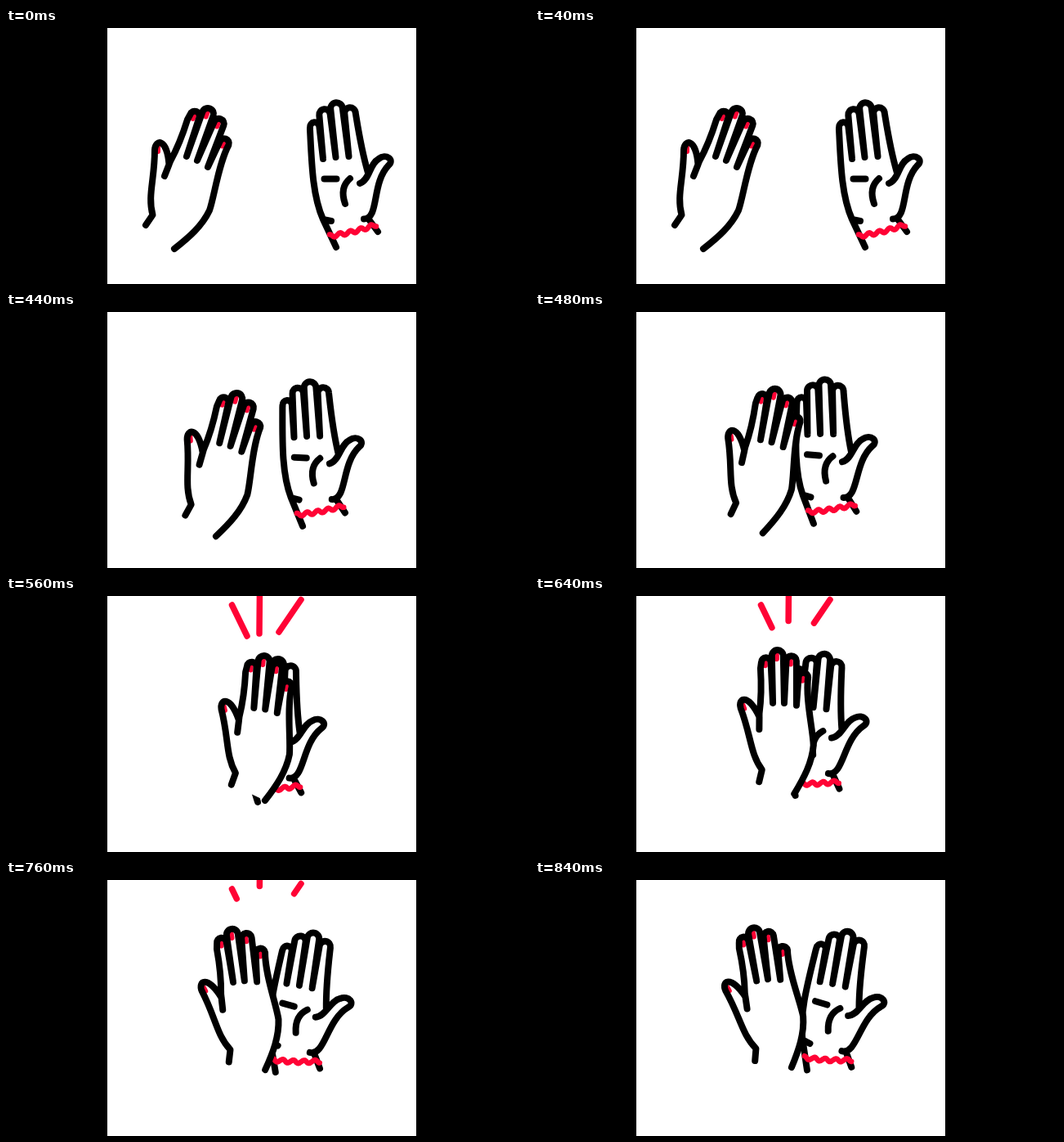
Write an HTML page with a canvas that moves like this. It is 640 by 313 pixels and loops after 1040 ms.

```html
<!DOCTYPE html>
<html lang="en">
<head>
<meta charset="utf-8">
<title>High five</title>
<style>
html, body { margin: 0; height: 100%; overflow: hidden; background: #000; }
canvas { display: block; }
</style>
</head>
<body>
<canvas id="stage" width="640" height="313"></canvas>
<script>
const ctx = document.getElementById('stage').getContext('2d');
const { PI, sin, cos, pow, min, max, floor } = Math;
const LOOP = 1040, STEP = 40, RED = '#ff0335';
const START = 360, IMPACT = 560, END = 840;
const radians = degrees => degrees * PI / 180;

// A fingertip is a half circle; the current point is joined to its left side.
function fingertip(path, x, y, radius, tilt) {
  path.arc(x, y, radius, PI + radians(tilt), 2 * PI + radians(tilt));
}

function makeBackHand() {
  const outline = new Path2D('M171 241L179.5 228.5C173 205 182 185 182 149' +
    'C183 136 197 134 199.5 167L194 181L201 163Q213 141 222 112');
  const nails = new Path2D('M186 146v5');
  const finger = (x, y, radius) => {
    fingertip(outline, x, y, radius, 20);
    nails.moveTo(x - 0.5, y - 1.5);
    nails.lineTo(x - 2.3, y + 3.5);
  };
  finger(231, 107.5, 5.8);
  outline.lineTo(221, 157);
  finger(247, 105, 7);
  outline.lineTo(234, 162);
  finger(260.5, 117, 6.2);
  outline.lineTo(247, 170);
  finger(267, 141, 5.8);
  outline.bezierCurveTo(260, 166, 255, 206, 249, 223);
  outline.bezierCurveTo(240, 242, 224, 256, 206, 270);
  return { outline, nails };
}

function makePalmHand() {
  const outline = new Path2D('M404 268L388 234L398 236L388 234C375 205 374 165 372 124');
  const finger = (x, y, radius) => fingertip(outline, x, y, radius, -6);
  finger(377.7, 121, 5.7);
  outline.lineTo(388, 160);
  finger(390, 106, 6.7);
  outline.lineTo(403.5, 158);
  finger(404.5, 98.5, 7.3);
  outline.lineTo(419.5, 157);
  finger(421, 104, 6.7);
  outline.bezierCurveTo(432, 130, 435, 150, 443, 177);

  const thumb = 'M433 190C445 186 445 166 456 160C465 153 476 161 468 168C447 190 457 233 438 233.5';
  const creases = 'M444 234L455 249M389.5 184.5h15M421 184Q408 195 415 215';
  outline.addPath(new Path2D(thumb + creases));
  return outline;
}

function makeBracelet() {
  const wave = new Path2D();
  for (let u = 0; u <= 1; u += 1 / 64) {
    wave.lineTo(396 + 57 * u, 254.5 - 14 * u + 1.5 * sin(PI * u) - 2 * cos(9 * PI * u));
  }
  return wave;
}

const backHand = makeBackHand();
const palmHand = makePalmHand();
const bracelet = makeBracelet();
const rays = [[276.5, 11, 295, 49], [310.5, -10, 310, 46], [361, 4.5, 334, 44]];

function progress(t, from, to) {
  return max(0, min(1, (t - from) / (to - from)));
}

// Linear travel that runs ahead by `lead` and starts late by `lag`.
function travel(u, lead, lag) {
  return u + lead * sin(PI * u) - lag * sin(2 * PI * u);
}

function stroke(path, color, width) {
  ctx.strokeStyle = color;
  ctx.lineWidth = width;
  ctx.stroke(path);
}

// Shifts a hand and turns it about its palm.
function withPose(palmX, palmY, dx, dy, turn, draw) {
  ctx.save();
  ctx.translate(palmX + dx, palmY + dy);
  ctx.rotate(radians(turn));
  ctx.translate(-palmX, -palmY);
  draw();
  ctx.restore();
}

function drawHands(t) {
  const approach = progress(t, START, IMPACT);
  const rebound = progress(t, IMPACT, END);
  const settle = 1 - pow(1 - rebound, 1.65);

  withPose(410, 180,
    -83.5 * travel(approach, 0.058, 0.03) + 37.5 * settle,
    -14.3 * approach - 15.9 * settle,
    8.2 * travel(approach, -0.05, 0) + 8.5 * settle,
    () => {
      stroke(palmHand, '#000', 8);
      stroke(bracelet, RED, 6.5);
    });

  withPose(225, 185,
    89.2 * pow(approach, 0.8) - 25.7 * pow(rebound, 0.8),
    26 * approach - 48 * approach * approach - 17.3 * settle,
    -14.4 * travel(approach, 0, 0.04) - 15.2 * settle,
    () => {
      ctx.fill(backHand.outline);
      stroke(backHand.nails, RED, 6);
      stroke(backHand.outline, '#000', 8);
    });
}

function drawRays(t) {
  if (t < IMPACT || t >= END) return;
  const gone = (t - IMPACT) / 290;
  for (const [x1, y1, x2, y2] of rays) {
    const ray = new Path2D();
    ray.moveTo(x1, y1);
    ray.lineTo(x2 + (x1 - x2) * gone, y2 + (y1 - y2) * gone);
    stroke(ray, RED, 7.5);
  }
}

function render(t) {
  ctx.fillStyle = '#000';
  ctx.fillRect(0, 0, 640, 313);
  ctx.fillStyle = '#fff';
  ctx.fillRect(124, 0, 378, 313);
  ctx.lineCap = ctx.lineJoin = 'round';
  drawHands(t);
  drawRays(t);
}

function tick() {
  render(floor(performance.now() % LOOP / STEP) * STEP);
  requestAnimationFrame(tick);
}
tick();
</script>
</body>
</html>
```
